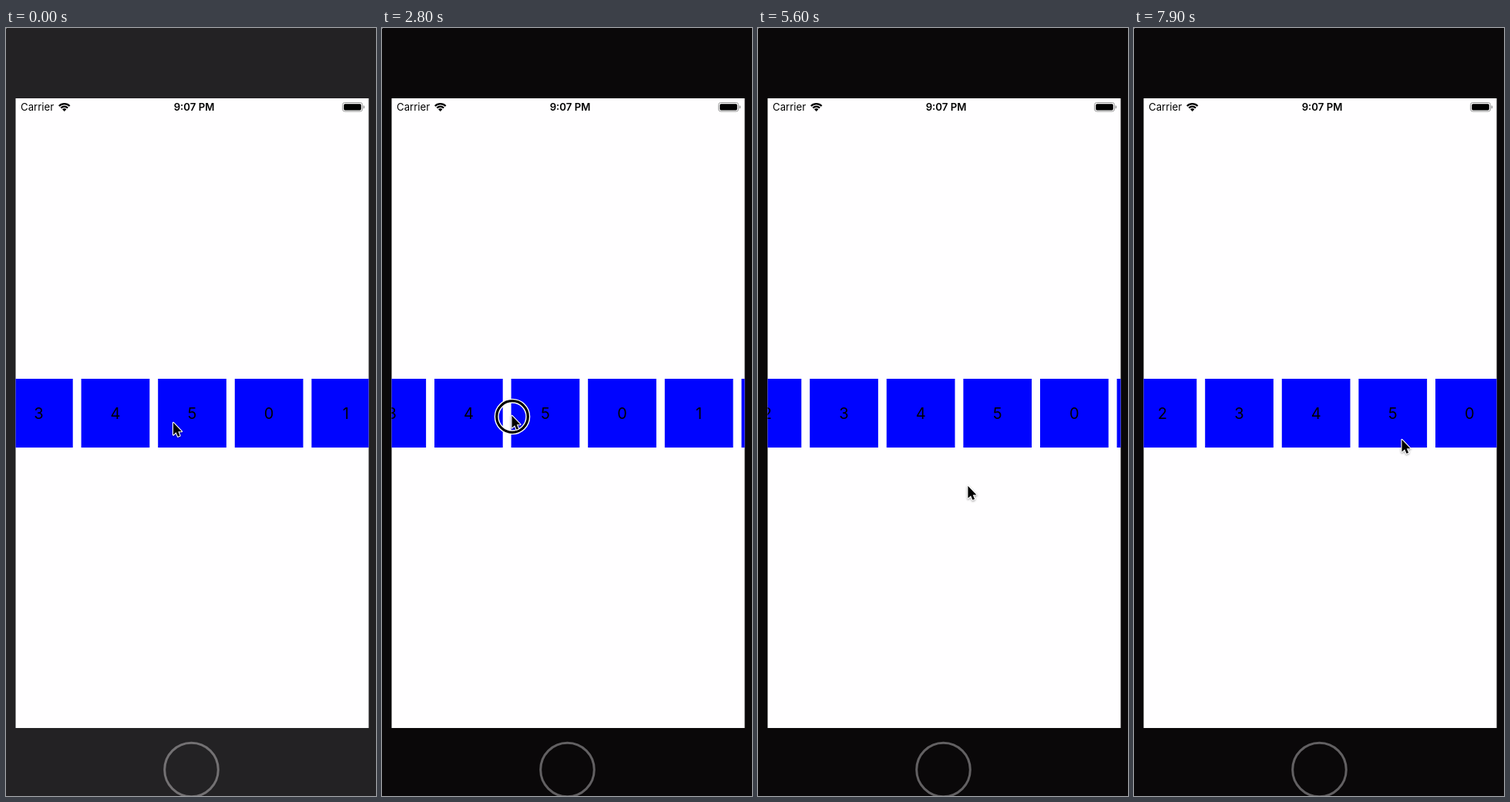
An HTML page with a canvas that plays this animation: 480 px wide and 994 px high, repeating every 8 s.

```html
<!DOCTYPE html>
<html lang="en">
<head>
<meta charset="utf-8">
<title>Endless carousel</title>
<style>
  html, body { margin: 0; width: 100%; height: 100%; overflow: hidden; background: #0a0809; }
  canvas { display: block; }
</style>
</head>
<body>
<canvas id="stage" width="480" height="994"></canvas>
<script>
const ctx = document.getElementById('stage').getContext('2d');
const LOOP = 8000, TICK = 100;
const PRESS = 2800, RELEASE = 3300;
const SCREEN = { x: 12.5, y: 91, w: 458, h: 815 };
const CELL = { y: 454, w: 88.7, h: 89, pitch: 99.6, count: 6 };

// [time, left edge of the cell labelled 5]
const scrollKeys = [
  [0, 197.2], [800, 187.8], [900, 187.8], [1400, 181.8], [2700, 167.6], [PRESS, 167.6],
  [RELEASE, 241.5, 'ease'], [3400, 242], [3500, 242], [3600, 243.2], [4700, 255.9],
  [6100, 272.2], [6200, 272.2], [6600, 276.9], [6700, 276.9], [7900, 291.4]
];
const cursorX = [
  [0, 216.5], [1400, 216], [2200, 216], [2700, 168, 'ease'], [PRESS, 168],
  [RELEASE, 263, 'ease'], [4000, 263], [4600, 273, 'ease'], [5400, 273],
  [6100, 267.5, 'ease'], [6900, 267.5], [7900, 347, 'ease']
];
const cursorY = [
  [0, 510], [1400, 508], [2200, 508], [2700, 501, 'ease'], [PRESS, 501],
  [RELEASE, 497, 'ease'], [4000, 497], [4600, 592, 'ease'], [7300, 592],
  [7600, 576], [7900, 532]
];

function valueAt(keys, t) {
  const next = keys.findIndex(k => k[0] >= t);
  if (next < 0) return keys[keys.length - 1][1];
  if (next === 0) return keys[0][1];
  const [t0, v0] = keys[next - 1], [t1, v1, ease] = keys[next];
  let p = (t - t0) / (t1 - t0);
  if (ease) p = p * p * (3 - 2 * p);
  return v0 + (v1 - v0) * p;
}

function circle(x, y, r, width, color) {
  ctx.beginPath();
  ctx.arc(x, y, r, 0, Math.PI * 2);
  ctx.lineWidth = width;
  ctx.strokeStyle = color;
  ctx.stroke();
}

function roundBox(x, y, w, h, r) {
  ctx.beginPath();
  ctx.roundRect(x, y, w, h, r);
}

function text(str, x, y, font, align) {
  ctx.font = font + ' Inter, sans-serif';
  ctx.textAlign = align;
  ctx.fillStyle = '#000';
  ctx.fillText(str, x, y);
}

function drawPhone(active) {
  ctx.fillStyle = active ? '#0a0809' : '#232224';
  ctx.fillRect(0, 0, 480, 994);
  ctx.fillStyle = '#777';
  ctx.fillRect(0, 0, 1, 1);
  circle(240.5, 960, 34.8, 3, active ? '#626062' : '#737173');
  ctx.fillStyle = '#fffeff';
  ctx.fillRect(SCREEN.x, SCREEN.y, SCREEN.w, SCREEN.h);
}

function drawWifi(x, y) {
  ctx.strokeStyle = ctx.fillStyle = '#000';
  ctx.lineWidth = 2.2;
  const from = -Math.PI * 0.75, to = -Math.PI * 0.25;
  for (const r of [9.8, 6.3]) {
    ctx.beginPath();
    ctx.arc(x, y, r, from, to);
    ctx.stroke();
  }
  ctx.beginPath();
  ctx.moveTo(x, y);
  ctx.arc(x, y, 3.8, from, to);
  ctx.fill();
}

function drawBattery() {
  roundBox(436.5, 96.5, 26, 11.5, 3);
  ctx.lineWidth = 1;
  ctx.strokeStyle = '#999';
  ctx.stroke();
  ctx.fillStyle = '#000';
  roundBox(438.2, 98.2, 22.6, 8.2, 1.6);
  ctx.fill();
  ctx.fillStyle = '#999';
  roundBox(463.6, 100.3, 1.6, 4, [0, 1.5, 1.5, 0]);
  ctx.fill();
}

function drawStatusBar() {
  text('Carrier', 19, 107.3, '13.2px', 'left');
  drawWifi(75.7, 108);
  text('9:07 PM', 244, 107.3, '600 13.2px', 'center');
  drawBattery();
}

function drawCells(left) {
  ctx.save();
  ctx.beginPath();
  ctx.rect(SCREEN.x, SCREEN.y, SCREEN.w, SCREEN.h);
  ctx.clip();
  for (let i = -3; i <= 3; i++) {
    const x = left + i * CELL.pitch;
    ctx.fillStyle = '#0004ff';
    ctx.fillRect(x, CELL.y, CELL.w, CELL.h);
    const label = (5 + i + CELL.count) % CELL.count;
    text(label, x + CELL.w / 2, 506, '20px', 'center');
  }
  ctx.restore();
}

function drawCursor(x, y) {
  const arrow = new Path2D('M0 0V15.8L3.7 12.4L6 18L8.6 16.9L6.3 11.4H11Z');
  ctx.save();
  ctx.translate(x + 0.5, y + 0.8);
  ctx.lineJoin = 'round';
  ctx.lineWidth = 2.2;
  ctx.strokeStyle = '#fff';
  ctx.shadowColor = 'rgba(0,0,0,.4)';
  ctx.shadowBlur = 2.5;
  ctx.shadowOffsetY = 1;
  ctx.stroke(arrow);
  ctx.shadowColor = 'transparent';
  ctx.fillStyle = '#000';
  ctx.fill(arrow);
  ctx.restore();
}

function drawPress(x, y) {
  circle(x, y, 20.3, 6, '#fff');
  circle(x, y, 20.3, 3.2, '#000');
}

function draw(t) {
  const x = valueAt(cursorX, t), y = valueAt(cursorY, t);
  drawPhone(t >= PRESS);
  drawStatusBar();
  drawCells(valueAt(scrollKeys, t));
  if (t >= PRESS && t < RELEASE) drawPress(x + 1, y + 2);
  drawCursor(x, y);
}

const start = performance.now();
function frame() {
  const t = (performance.now() - start) % LOOP;
  draw(Math.floor(t / TICK) * TICK);
  requestAnimationFrame(frame);
}
frame();
</script>
</body>
</html>
```
